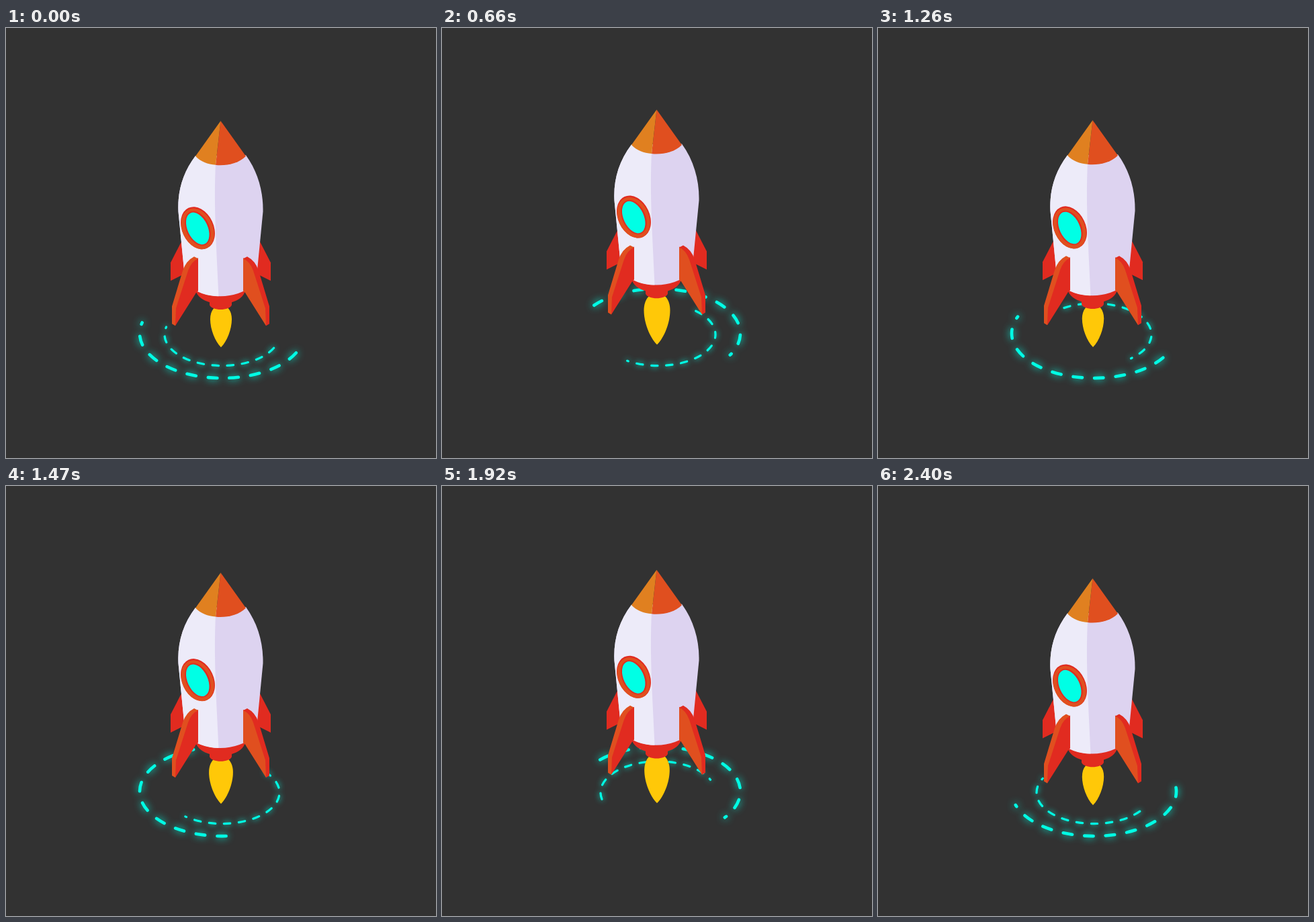
These frames come from a looping animation (640x640 px, 2430 ms). An HTML page:

```html
<!DOCTYPE html>
<html lang="en">
<head>
<meta charset="utf-8">
<title>Rocket</title>
<style>
  html, body { margin: 0; height: 100%; overflow: hidden; background: #323232; }
  svg { display: block; width: 100vw; height: 100vh; }
  .ring {
    fill: none; stroke: #00ffe5; stroke-width: 4.6; stroke-linecap: round;
    filter: drop-shadow(0 0 6px #00ffe5);
  }
  .red { fill: #e12b20; }
  .orange { fill: #e04f1f; }
  .amber { fill: #e08020; }
  .light { fill: #edebf9; }
  .lilac { fill: #ddd3f0; }
  .cyan { fill: #00ffe5; }
  .yellow { fill: #ffc808; }
</style>
</head>
<body>
<svg viewBox="0 0 640 640">
  <defs>
    <path id="orbit" pathLength="360" d="M122.5 0A122.5 66.5 0 0 1 -122.5 0A122.5 66.5 0 0 1 122.5 0Z"/>
    <path id="finFace" d="M286 342V391Q283 393 281 397L252 443L250 417L268 360Q275 345 286 342Z"/>
    <path id="finEdge" d="M280 340L286 343Q276 347 271 361L253 417L252 443L247 440V414L263 361Q268 346 280 340Z"/>
    <path id="backFin" d="M262 316L245 349V376L267 365Z"/>
  </defs>

  <g transform="translate(321.5 454.6)"><use href="#orbit" id="outer" class="ring"/></g>
  <g transform="translate(321.5 456.2) scale(.698)"><use href="#orbit" id="inner" class="ring"/></g>

  <g id="rocket">
    <path id="flame" class="yellow" d="M320 475C311 466 304 448 304 433C304 420 311 412 320 412S336 420 336 433C336 448 329 466 320 475Z"/>

    <g class="red">
      <use href="#backFin"/>
      <use href="#backFin" transform="matrix(-1 0 0 1 639 0)"/>
      <path d="M281 388C285 401 294 405 303 408V412C306 421 333 421 336 412V408C345 405 354 401 357 388Z"/>
    </g>

    <path class="lilac" d="M282 190C263 215 255 243 256.500 273L267 380Q290 399 319 399T372 380L382.500 273C383 243 375 214 357 189Z"/>
    <path class="light" d="M282 190C263 215 255 243 256.500 273L267 380Q289 399 316.500 399C313 320 309 270 312 200Z"/>

    <path class="orange" d="M319.500 138L357 190.500C348 200 333 204 319 204Q315 204 312 203.500Z"/>
    <path class="amber" d="M319.500 138L282 190.500C290 199 300 202.500 312 203.500Z"/>

    <g transform="translate(285.500 297.500) rotate(-25)">
      <ellipse class="red" rx="23.500" ry="33"/>
      <ellipse class="orange" cx="-.8" cy="1" rx="22.600" ry="31.800"/>
      <ellipse class="red" cx="-.3" cy=".4" rx="17.200" ry="27"/>
      <ellipse class="cyan" cx="-.5" cy=".5" rx="15" ry="25.300"/>
    </g>

    <use href="#finFace" class="red"/>
    <use href="#finEdge" class="orange"/>
    <g transform="matrix(-1 0 0 1 639 0)">
      <use href="#finFace" class="orange"/>
      <use href="#finEdge" class="red"/>
    </g>
  </g>
</svg>
<script>
  const LOOP = 2430, STEP = 30;
  const [outer, inner, rocket, flame] =
    ["outer", "inner", "rocket", "flame"].map(id => document.getElementById(id));

  // Nine full dashes, one short leading dash, then an empty rest of the ring.
  const DASH = 8, PERIOD = 18.8, TIP = 1.6;
  const pattern = [...Array(9).fill([DASH, PERIOD - DASH]).flat(), TIP, 360 - 9 * PERIOD - TIP].join(" ");
  for (const ring of [outer, inner]) ring.style.strokeDasharray = pattern;

  const spin = (ring, start, speed, t) => {
    ring.style.strokeDashoffset = -((start + speed * t) % 360);
  };

  function draw(now) {
    const t = Math.floor(now % LOOP / STEP) * STEP;
    spin(outer, 19.1, 0.2906, t);
    spin(inner, 19, 0.4542, t);

    const lift = 8.65 * (1 - Math.cos(2 * Math.PI * (t - 1172) / 1145));
    rocket.setAttribute("transform", `translate(0 ${0.3 - lift})`);
    flame.setAttribute("transform", `translate(320 416) scale(${1 + 0.0129 * lift}) translate(-320 -416)`);
    requestAnimationFrame(draw);
  }
  draw(0);
</script>
</body>
</html>
```
